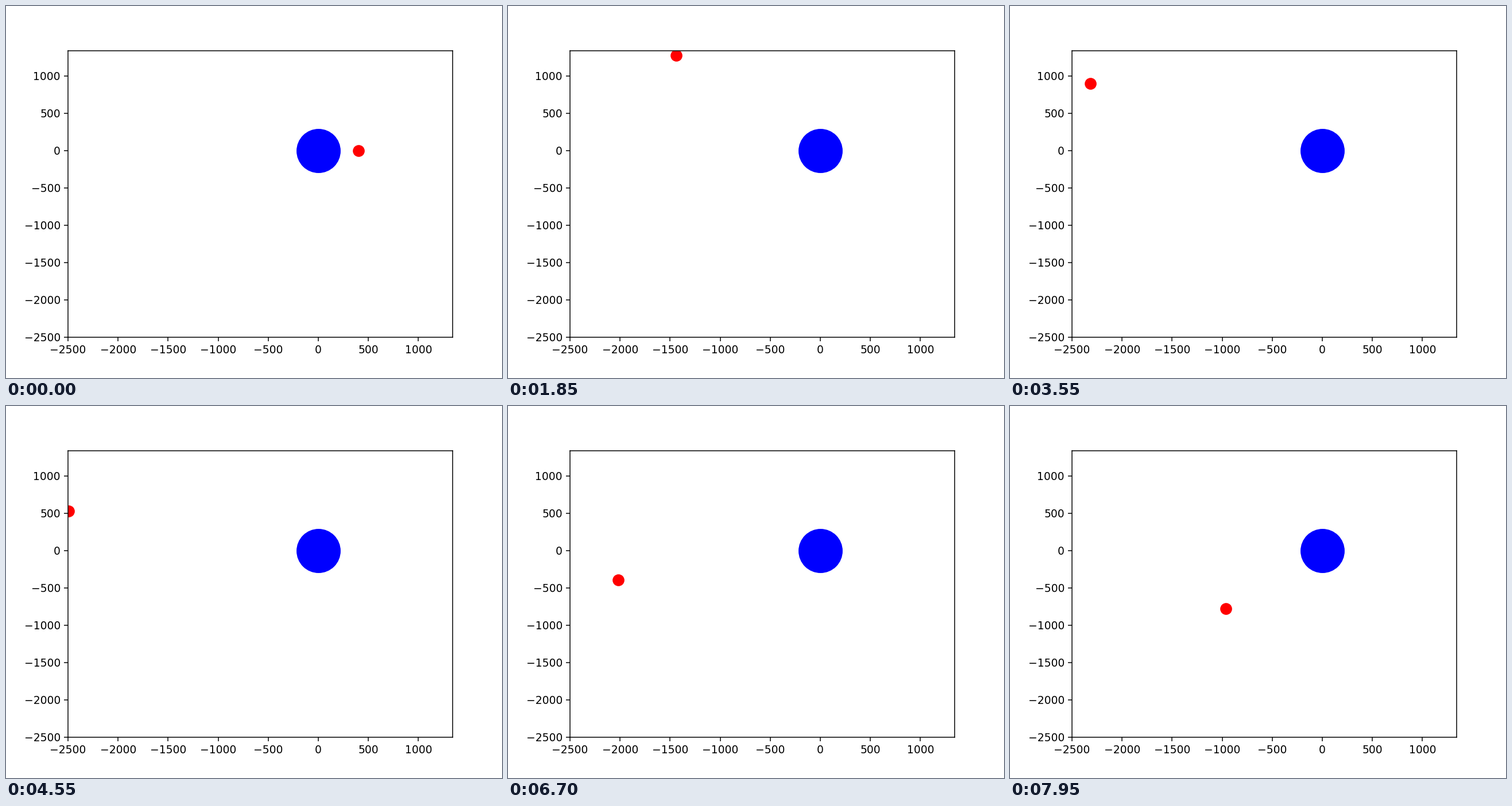
A matplotlib script that plays this animation: 864x648 px, repeating every 8 s.

```python
import numpy as np
import matplotlib.pyplot as plt
from matplotlib.animation import FuncAnimation

FRAMES = 160
STEP_MS = 50
GM = 4.0e6          # gravity of the planet, units^3 / step^2
START = (400.0, 0.0)
SPEED = (0.0, 130.4)


def orbit(count):
    """Positions of the moon, one step per frame (semi-implicit Euler)."""
    pos = np.array(START)
    vel = np.array(SPEED)
    path = [pos.copy()]
    for _ in range(count - 1):
        pos = pos + vel
        vel = vel - GM * pos / np.hypot(*pos) ** 3
        path.append(pos)
    return np.array(path)


path = orbit(FRAMES)

fig, ax = plt.subplots(figsize=(6.4, 4.8), dpi=135)
ax.set_xlim(-2500, 1340)
ax.set_ylim(-2500, 1340)
ax.plot([0], [0], "o", color="blue", markersize=40)
moon, = ax.plot([], [], "o", color="red", markersize=10)


def update(i):
    x, y = path[i]
    moon.set_data([x], [y])
    return moon,


anim = FuncAnimation(fig, update, frames=FRAMES, interval=STEP_MS,
                     repeat=True, repeat_delay=0)
plt.show()
```
